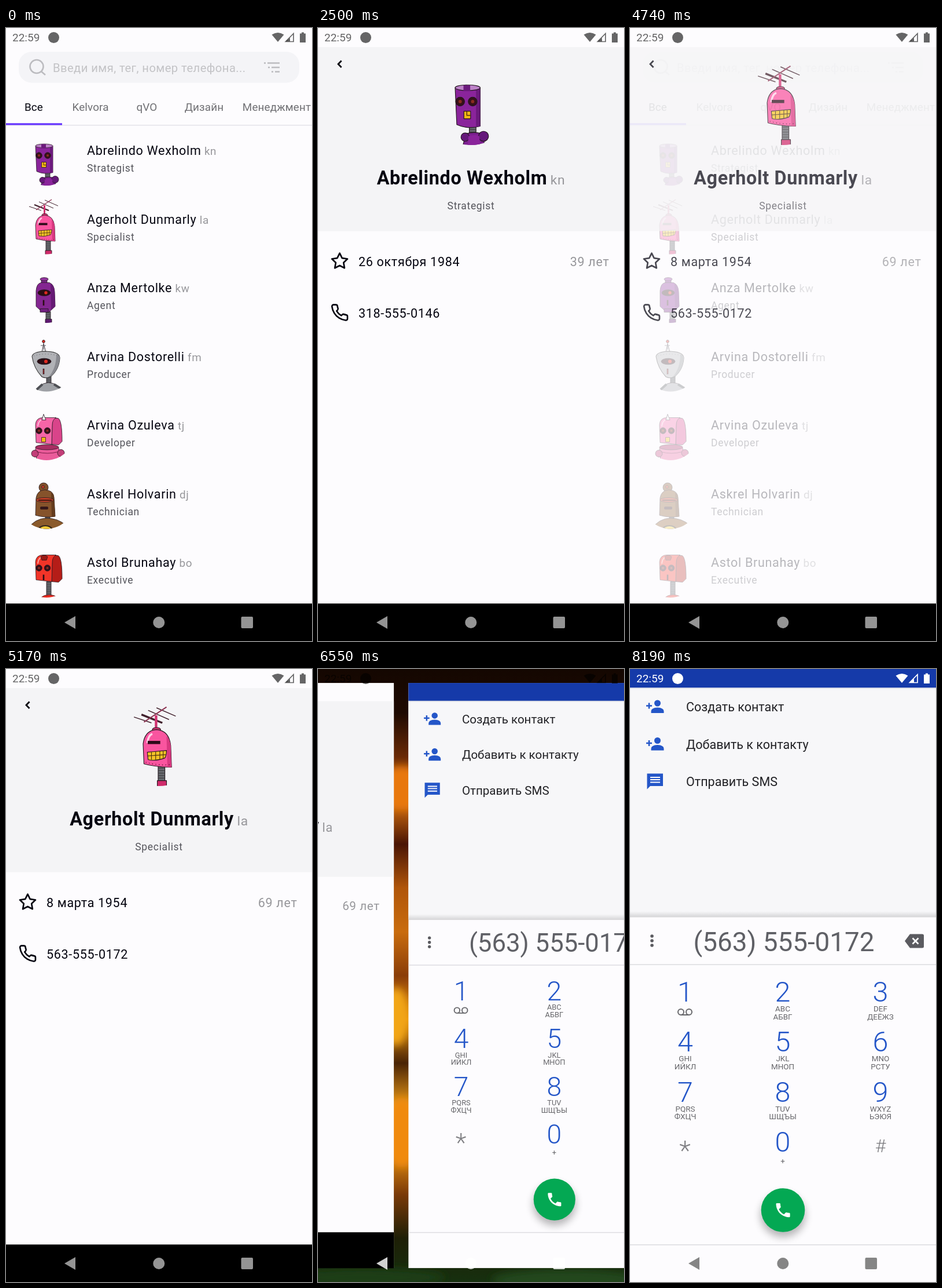
Write an HTML page that moves like this. It is 529 px wide and 1058 px high and loops after 8.28 s.

```html
<!DOCTYPE html>
<html lang="ru">
<head>
<meta charset="utf-8">
<title>Contacts</title>
<style>
  html, body { margin: 0; width: 100%; height: 100%; overflow: hidden; background: #000; }
  svg { display: block; width: 100vw; height: 100vh; }
  text { font-family: Roboto, "Noto Sans", sans-serif; white-space: pre; }
  .spaced { letter-spacing: .673px; }
  .ink { stroke: #241820; stroke-width: .8; stroke-linejoin: round; }
</style>
</head>
<body>
<svg id="stage" viewBox="0 0 529 1058"></svg>
<script>
const W = 529, H = 1058, LOOP = 8280, STEP = LOOP / 96;
const PAPER = '#fdfcfe', DARK = '#050510', GREY = '#97979b', BLUE = '#2456c8';

const people = [
  ['Abrelindo Wexholm', 'kn', 'Strategist', '26 октября 1984', '39 лет', '318-555-0146'],
  ['Agerholt Dunmarly', 'la', 'Specialist', '8 марта 1954', '69 лет', '563-555-0172'],
  ['Anza Mertolke', 'kw', 'Agent'],
  ['Arvina Dostorelli', 'fm', 'Producer'],
  ['Arvina Ozuleva', 'tj', 'Developer'],
  ['Askrel Holvarin', 'dj', 'Technician'],
  ['Astol Brunahay', 'bo', 'Executive']
];

const text = (x, y, s, size, fill = DARK, more = '') =>
  `<text x="${x}" y="${y}" font-size="${size}" fill="${fill}" ${more}>${s}</text>`;
const rect = (x, y, w, h, fill, more = '') =>
  `<rect x="${x}" y="${y}" width="${w}" height="${h}" fill="${fill}" ${more}/>`;
const oval = (x, y, rx, ry, fill, more = '') =>
  `<ellipse cx="${x}" cy="${y}" rx="${rx}" ry="${ry}" fill="${fill}" ${more}/>`;
const dot = (x, y, r, fill, more) => oval(x, y, r, r, fill, more);
const path = (d, fill, more = '') => `<path d="${d}" fill="${fill}" ${more}/>`;
const line = (d, color, width, more = '') =>
  `<path d="${d}" fill="none" stroke="${color}" stroke-width="${width}" ${more}/>`;
const tagged = (name, tag, size) =>
  `${name}<tspan dx="5.4" font-size="${size}" font-weight="400" fill="${GREY}">${tag}</tspan>`;
const mid = 'text-anchor="middle"', ink = 'class="ink"';

// Robot parts, measured from the avatar centre
const eye = (x, y) => dot(x, y, 5.3, '#35101a', ink) + dot(x, y, 2, '#8c2b20');
const neck = (x, y, h) => rect(x, y, 8, h, '#686a70', ink) +
  Array.from({ length: Math.floor(h / 3) }, (_, i) => line(`M${x} ${y + 2 + i * 3}h8`, '#333', .7)).join('');
const slit = line('M-5 9V18.5', '#2a0d14', 2.6);
const visor = (rx, red) => oval(-4, -3.5, rx, 5.3, '#2a0d14', ink) + dot(-1, -3.5, red, '#e02a20');
const box = (front, side) =>
  path('M10-24H20Q27-21 27 16L21 22 9 21Z', side, ink) +
  path('M-19-13Q-18-25-6-25L17-25Q10-22 10-12L9 21-18 18Z', front, ink) +
  line('M-15-10Q-14-19-9-21', '#fff8', 2) + eye(-13, -2.5) + eye(1.5, -2.5);

const robots = [
  neck(-2, 25, 10) +
    path('M-10 50L-6 35Q4 32 13 35L17 50Z', '#7c2090', ink) +
    dot(-7, 39, 5, '#65187a', ink) + dot(15, 38, 6, '#65187a', ink) +
    path('M-4 50L-3 38Q5 35 10 38L11 50Z', '#8a249b') +
    path('M-19-20L-17 24Q-4 30 11 26V-20Z', '#8a249b', ink) +
    path('M6-18H11V26L6 27Z', '#6c1a7d') +
    oval(-4, -20, 15, 3.4, '#bd82c8', ink) + rect(-9, -23, 8, 7, '#6c1a7d') +
    eye(-13, -3.5) + eye(2, -3.5) + rect(-8.5, 8, 8, 9, '#f5b817', ink) + line('M-5 8v5h5', '#58300c', 1),

  neck(-1, 25, 17) + rect(-2, 42, 11, 8, '#cf2b6b', ink) +
    line('M-30-34L-9-27M-13-42L12-31M-3-45L20-35', '#40202c', 1) +
    line('M-21-37L4-27', '#40202c', 2.4) + line('M-18-28L9-46', '#8d3553', 1.4) +
    line('M-3.5-36V-19', '#d13270', 3) + oval(-3, -19, 5, 2.5, '#d13270', ink) +
    path('M-18 22L-19-2Q-17-18-3-19 12-18 14 0L15 26Q-2 26-18 22Z', '#f9559f', ink) +
    path('M9-11Q13-8 14 0L15 26 10 26Z', '#d83980') +
    line('M-14-3Q-13-12-8-14', '#ffd0e5', 2.4) +
    rect(-13.5, -5.5, 15, 3.8, '#2d0a19') +
    path('M-14 8L9 6Q9 12 7 15-4 19-13 17Z', '#f5c326', ink) +
    line('M-14 12.5L8 11M-9 8V17M-4 7V17M1 7V16.5M5 7V15.5', '#4c3010', .8) +
    line('M-16 20Q-2 24 13 23', '#651238', 1, 'stroke-dasharray="1 3"'),

  neck(-1, 29, 14) + rect(-2, 42, 11, 8, '#5e1a70', ink) +
    rect(-9, -27, 10, 8, '#7b258b', ink) + oval(-4, -27, 7, 2.8, '#93349f', ink) +
    path('M-18-7Q-17-20-9-21L5-21Q13-18 14-6L15 20 4 30-8 29-18 20Z', '#842691', ink) +
    path('M7-19Q13-17 14-6L15 20 8 26Z', '#651a74') + visor(11, 2.7) + slit +
    rect(-11, 24, 14, 6, '#70207f', ink),

  neck(0, 22, 12) + path('M-18 50Q-15 35 3 33 22 34 28 50Z', '#9fa1a6', ink) +
    line('M-17 45L-7 36M13 36L26 44', '#4f5055', 4) +
    path('M-8-20L-5-34-1-20Z', '#e8e8eb', ink) + line('M-5-38V-24M-10-31H-1', '#55555c', 1) +
    dot(-5, -38, 2.4, '#d92c22', ink) +
    path('M-25-12Q-24-20-4-21 22-21 23-10 22 10 8 22 0 27-8 23-22 8-25-12Z', '#b1b2b6', 'stroke="#333" stroke-width="1.1"') +
    path('M17-16Q23-14 23-10 22 10 8 22L4 23Q17 8 17-16Z', '#898a90') +
    line('M-22-13Q-4-19 18-14', '#55565a', 1, 'stroke-dasharray="1 4"') + visor(12, 3) + slit +
    line('M-5 10V17.5', '#b8322c', 1),

  path('M-17 50L-19 27H21L25 50Z', '#ea5b9a', ink) +
    dot(-20, 37, 6, '#c23e78', ink) + dot(25, 36, 6, '#c23e78', ink) +
    oval(1, 26, 20, 4.5, '#a92e63', ink) + line('M-17 34Q2 39 20 34', '#7c1c48', 1) +
    box('#f565a7', '#d9448a') + path('M-8-21L-5-31-1-21Z', '#f3f0f3', ink) +
    rect(-8.5, 9, 7, 8, '#f5b817', ink),

  neck(-2, 27, 8) + path('M-34 50Q-20 30 0 30 20 30 33 42V50Z', '#8a5a2b', ink) +
    oval(-2, 50, 13, 8, '#35281c') + oval(-2, 50, 10, 6, '#f4cc35') +
    dot(-5, -23, 8, '#80502a', ink) + dot(-6, -24, 2.4, '#cf3b24', ink) +
    path('M-19 25L-18-5Q-16-18-3-19 12-18 13-6L15 27Q-2 30-19 25Z', '#85532b', ink) +
    path('M8-14Q13-12 13-6L15 27 9 28Z', '#633b1d') +
    oval(-3, -1.5, 15, 4, '#bd4026', ink) + line('M-14-1H9', '#411811', 1.8) +
    rect(-11, 10, 14, 5, '#35181a', 'rx="2"'),

  neck(0, 21, 23) + path('M-12 50Q4 37 22 50Z', '#e92b20', ink) +
    box('#f23428', '#b51d18') + path('M-10-22Q-4-27 2-22L0-16H-8Z', '#9c1914', ink) + slit
];
const avatar = (i, x, y, k) =>
  `<g transform="translate(${x} ${y}) scale(${k})" clip-path="url(#round)">${robots[i]}</g>`;

const handset = 'M6.62 10.79c1.44 2.83 3.76 5.14 6.59 6.59l2.2-2.2c.27-.27.67-.36 1.02-.24 1.12.37 2.33.57 3.57.57' +
  '.55 0 1 .45 1 1V20c0 .55-.45 1-1 1-9.39 0-17-7.61-17-17 0-.55.45-1 1-1h3.5c.55 0 1 .45 1 1 0 1.25.2 2.45' +
  '.57 3.57.11.35.03.74-.25 1.02z';
const phoneOutline = 'M22 16.9v3a2 2 0 0 1-2.2 2 19.8 19.8 0 0 1-8.6-3 19.5 19.5 0 0 1-6-6 19.8 19.8 0 0 1-3.1-8.7' +
  'A2 2 0 0 1 4.1 2h3a2 2 0 0 1 2 1.7 12.8 12.8 0 0 0 .7 2.8 2 2 0 0 1-.4 2.1L8.1 9.9a16 16 0 0 0 6 6l1.3-1.3' +
  'a2 2 0 0 1 2.1-.4 12.8 12.8 0 0 0 2.8.7A2 2 0 0 1 22 16.9z';
const star = 'M12 2l3.1 6.3L22 9.3l-5 4.8 1.2 6.9L12 17.8 5.8 21 7 14.1 2 9.3l6.9-1z';
const outline = (d, x, y) =>
  `<g transform="translate(${x} ${y}) scale(1.347)">${line(d, DARK, 2, 'stroke-linejoin="round"')}</g>`;

function listScreen() {
  const tabs = [['Все', 48], ['Kelvora', 146], ['qVO', 243.5], ['Дизайн', 342.5], ['Менеджмент', 468]];
  return rect(22, 41, 485, 53.5, '#f4f4f7', 'rx="22"') +
    line('M61.5 75.5L68 81M41.5 66.5a11.5 11.5 0 1 1 23 0a11.5 11.5 0 1 1-23 0', '#bcbcc0', 2.6) +
    text(81, 76, 'Введи имя, тег, номер телефона...', 20.2, '#c3c3c6', 'letter-spacing=".43"') +
    line('M446 60.5h3m3 0h21M453 68h3m3 0h14M459 75.5h3m3 0h8', '#bcbcc0', 2.4) +
    tabs.map(([s, x], i) => text(x, 142.5, s, 18.86, i ? '#707074' : DARK, mid + ' letter-spacing=".13"')).join('') +
    rect(0, 167, W, 1.5, '#e4e4ea') + rect(0, 164.3, 97, 3.2, '#6534ff') +
    people.map(([name, tag, job], i) => {
      const y = i * 118.5;
      return avatar(i, 70, y + 223.5, 1) +
        text(140, y + 219, tagged(name, tag, 18.86), 21.55, DARK, 'class="spaced"') +
        text(140, y + 248, job, 17.5, '#55555c', 'class="spaced"');
    }).join('');
}

function detailScreen(i) {
  const [name, tag, job, born, age, phone] = people[i];
  const sp = 'class="spaced"';
  return rect(0, 33, W, 317.5, '#f4f4f6') + line('M40.5 56.5L35 62.3 40.5 68', DARK, 2.8) +
    avatar(i, 264.5, 132, 1.444) +
    text(264.5, 269.5, tagged(name, tag, 22.9), 32.3, DARK, `${mid} ${sp} font-weight="700"`) +
    text(264.5, 313, job, 17.5, '#55555c', `${mid} ${sp}`) +
    outline(star, 21.3, 386) + outline(phoneOutline, 21.3, 475) +
    text(70, 410.5, born, 21.55, DARK, sp) +
    text(503.5, 410.5, age, 21.55, GREY, sp + ' text-anchor="end"') +
    text(70, 499.5, phone, 21.55, DARK, sp);
}

function dialerScreen() {
  const latin = ['', 'ABC', 'DEF', 'GHI', 'JKL', 'MNO', 'PQRS', 'TUV', 'WXYZ'];
  const cyrillic = ['', 'АБВГ', 'ДЕЁЖЗ', 'ИЙКЛ', 'МНОП', 'РСТУ', 'ФХЦЧ', 'ШЩЪЫ', 'ЬЭЮЯ'];
  const cols = [95.5, 264, 433];
  const digit = (x, y, s) => text(x, y, s, 48.5, BLUE, mid + ' font-weight="300"');
  const small = (x, y, s) => text(x, y, s, 13.47, '#66666a', mid);
  const person = y => `<g transform="translate(0 ${y})">` + dot(47.5, -6, 5.5, BLUE) +
    path('M36.5 11V8Q36.5 2 47.5 1.5 58.5 2 58.5 8V11Z', BLUE) + line('M28-1.5H38M33-6.5V3.5', BLUE, 2.6) + '</g>';
  const keys = latin.map((s, i) => {
    const x = cols[i % 3], y = 574 + Math.floor(i / 3) * 86.3;
    return digit(x, y, i + 1) + small(x, y + 17, s) + small(x, y + 30.5, cyrillic[i]);
  }).join('');
  return rect(0, 0, W, H, PAPER) + rect(0, 32, W, 396, '#f7f7f9') +
    rect(0, 0, W, 32.3, '#153aa9') + rect(0, 32.3, W, 1.5, '#d5d8e2') +
    person(65) + person(129.5) + path('M29.5 180.5H57V202H35L29.5 207.5Z', BLUE) +
    line('M35 187H52M35 191H52M35 195.5H52', PAPER, 2) +
    ['Создать контакт', 'Добавить к контакту', 'Отправить SMS']
      .map((s, i) => text(97, 73 + i * 64.6, s, 21.55, '#222226')).join('') +
    rect(0, 418, W, 10.5, 'url(#edge)') +
    [461, 469, 477].map(y => dot(38, y, 2.8, '#5b5b60')).join('') +
    text(266, 486.5, '(563) 555-0172', 45.8, '#5f6066', mid) +
    path('M475 469.5L484 457.5H505Q508 457.5 508 460V479Q508 481.5 505 481.5H484Z', '#5b5b60') +
    line('M488.5 464.5l10 10m0-10l-10 10', '#fff', 2.6) +
    rect(0, 509.5, W, 1.5, '#dcdce0') + keys +
    line('M83 592a5 5 0 1 1 10 0a5 5 0 1 1-10 0M97 592a5 5 0 1 1 10 0a5 5 0 1 1-10 0M88 597H102', '#66666a', 2) +
    text(95, 847, '*', 46, '#808084', mid + ' font-weight="300"') +
    digit(264, 833, '0') + small(264, 854, '+') +
    text(433, 834, '#', 32, '#808084', mid + ' font-weight="300"') +
    oval(264.5, 943, 39, 38, '#000', 'opacity=".28" filter="url(#soft)"') + dot(264.5, 934, 37.8, '#04a853') +
    `<g transform="translate(248.5 918) scale(1.34)">${path(handset, '#fff')}</g>` +
    rect(0, 993, W, 1.5, '#dcdce0');
}

const wallpaper = rect(0, 0, W, H, 'url(#petals)') +
  [[145, 205, 40, 38, '#e8780c'], [135, 600, 22, 50, '#f2a616'], [145, 800, 30, 60, '#f08a10'],
   [80, 1050, 140, 16, '#1c3d12'], [430, 1054, 130, 18, '#24461a']]
    .map(([x, y, rx, ry, c]) => oval(x, y, rx, ry, c, 'filter="url(#soft)"')).join('');

const statusIcons = text(11, 23, '22:59', 19, 'currentColor') + dot(82.5, 16.5, 9.5, 'currentColor') +
  path('M459.5 11.5Q470 4.5 480.5 11.5L470 24Z', 'currentColor') +
  line('M497 9.5V23.5H483.5Z', 'currentColor', 1.7) + path('M491 17V23H484Z', 'currentColor') +
  path('M511 7.5H515V9.5H518V25H508V9.5H511Z', 'currentColor');
const navIcons = path('M101 1026L120 1015V1037Z', 'currentColor') + dot(264.3, 1026, 10, 'currentColor') +
  rect(406.5, 1016, 20.5, 20, 'currentColor', 'rx="2"');

const petals = ['#140701', '#1e0a02', '#6a2a06', '#dc740f', '#4a1504', '#b0560a', '#c96c0d', '#8a3d08',
  '#e8920e', '#4a2405', '#eb9a16', '#e8900f', '#7a3a08', '#1e1f06', '#16300f'];

stage.innerHTML = `<defs>
  <clipPath id="round"><circle r="48.5"/></clipPath>
  <filter id="soft" x="-50%" y="-50%" width="200%" height="200%"><feGaussianBlur stdDeviation="7"/></filter>
  <linearGradient id="edge" x2="0" y2="1"><stop stop-color="#000" stop-opacity="0"/><stop offset="1" stop-color="#000" stop-opacity=".14"/></linearGradient>
  <linearGradient id="petals" x2="0" y2="1">${petals.map((c, i) => `<stop offset="${i / (petals.length - 1)}" stop-color="${c}"/>`).join('')}</linearGradient>
  </defs>${wallpaper}
  <g id="app">${rect(0, 0, W, H, PAPER)}
    <g id="list">${listScreen()}</g><g id="first">${detailScreen(0)}</g><g id="second">${detailScreen(1)}</g>
    ${rect(0, 993.3, W, 65, '#000')}</g>
  <g id="dialer">${dialerScreen()}</g>
  <g id="status">${statusIcons}</g><g id="nav">${navIcons}</g>`;

const el = Object.fromEntries(['app', 'list', 'first', 'second', 'dialer', 'status', 'nav']
  .map(id => [id, document.getElementById(id)]));

// Standard material curve: cubic-bezier(.4, 0, .2, 1)
function ease(x) {
  if (x <= 0) return 0;
  if (x >= 1) return 1;
  let lo = 0, hi = 1, s;
  for (let i = 0; i < 24; i++) {
    s = (lo + hi) / 2;
    const r = 1 - s;
    if (1.2 * s * r * r + .6 * s * s * r + s * s * s < x) lo = s; else hi = s;
  }
  return s * s * (3 - 2 * s);
}
const ramp = (t, start, length) => ease((t - start) / length);

function show(node, alpha) {
  node.style.opacity = alpha;
  node.style.display = alpha > 0 ? '' : 'none';
}

function draw(now) {
  const t = Math.floor((now % LOOP + 6) / STEP) % 96 * STEP;

  const a = ramp(t, 1660, 700) - ramp(t, 3120, 700);
  const b = ramp(t, 4420, 700);
  show(el.list, 1 - a - b);
  show(el.first, a);
  show(el.second, b);

  // Both windows shrink, slide sideways and grow back
  const scale = 1 - .05 * (ramp(t, 6218, 283) - ramp(t, 6501, 317));
  const slide = ramp(t, 6322.4, 500);
  const place = (node, x) => node.setAttribute('transform',
    `translate(${W / 2} ${H / 2}) scale(${scale}) translate(${x * W * 1.05 - W / 2} ${-H / 2})`);
  place(el.app, -slide);
  place(el.dialer, 1 - slide);

  el.status.style.color = t < 6640 ? 'rgba(0,0,0,.6)' : '#fff';
  el.nav.style.color = t < 6300 ? '#949494' : t < 6640 ? 'rgba(255,255,255,.82)' : '#858585';
}

const begin = performance.now();
(function tick() {
  draw(performance.now() - begin);
  requestAnimationFrame(tick);
})();
</script>
</body>
</html>
```
